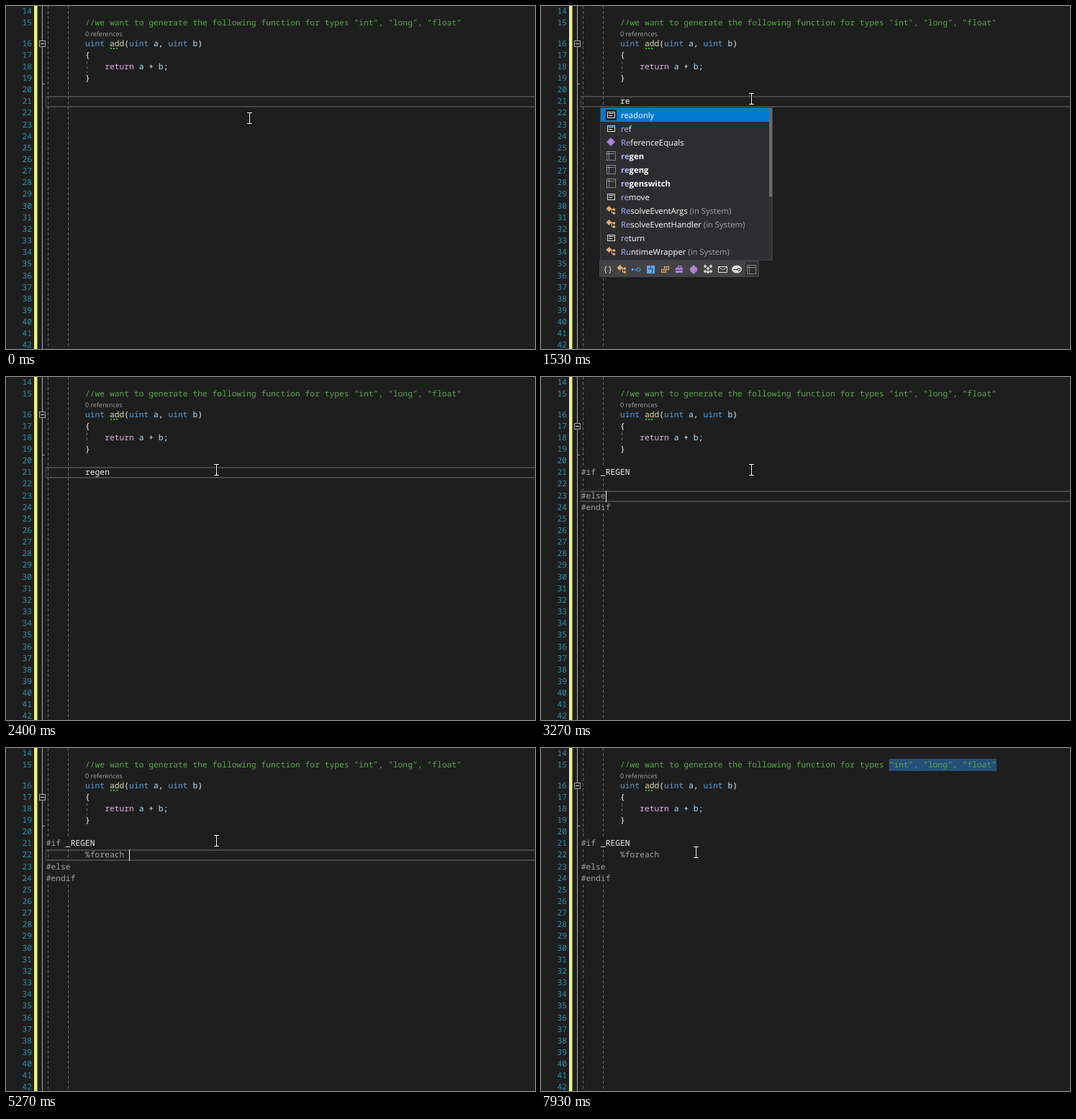
Recreate the animation shown at these times as an HTML page with a canvas. Size 735 by 477 pixels, loop 8 s.

```html
<!DOCTYPE html>
<html>
<head>
<meta charset="utf-8">
<style>
  html, body { margin: 0; width: 100%; height: 100%; overflow: hidden; background: #1e1e1e; }
  canvas { display: block; }
</style>
</head>
<body>
<canvas id="stage" width="735" height="477"></canvas>
<script>
const ctx = document.getElementById('stage').getContext('2d');
const LOOP = 8000, TICK = 1000 / 15, CELL = 6.79, LEFT = 55.7, CODE = 110;
const MONO = '11.3px "Noto Sans Mono", monospace';
const UI = '11.3px "Open Sans", sans-serif';
const UI_BOLD = 'bold 11.3px "Open Sans", sans-serif';
const PLAIN = '#f0f0f0', GREY = '#a3a3a3', BLUE = '#569cd6', LOCAL = '#b0e0ff';
const ORANGE = '#e8ab6a', PURPLE = '#b180d7', LIGHT = '#d8d8d8', SKY = '#55aaff';

const COMMENT = '//we want to generate the following function for types "int", "long", "float"';
const MOUSE = [
  [0, 338, 156], [130, 316, 141], [330, 292, 129], [5870, 292, 129], [6070, 400, 74],
  [6270, 590, 17], [6400, 634, 20], [6470, 632, 21], [6670, 576, 21], [6870, 532, 22],
  [7130, 486, 23], [7400, 486, 23], [7530, 410, 72], [7730, 226, 166], [7930, 215, 145]
];
const REGEN_TIMES = [1330, 1470, 1870, 2000, 2130];
const FOREACH_TIMES = [3930, 4270, 4330, 4400, 4530, 4600, 4730, 4870, 5270];
// from, to, line, column
const CARETS = [
  [330, 870, 21, 8], [1330, 1470, 21, 9], [2470, 2930, 24, 6], [3270, 3400, 23, 5],
  [3400, 3530, 21, 5], [3530, 3930, 22, 8]
];
const RX = 'System.Text.RegularExpressions';
const SHORT_LIST = [
  ['keyword', 'readonly'], ['keyword', 'ref'], ['method', 'ReferenceEquals'],
  ['snippet', 'regen'], ['snippet', 'regeng'], ['snippet', 'regenswitch'],
  ['keyword', 'remove'], ['class', 'ResolveEventArgs', 'System'],
  ['class', 'ResolveEventHandler', 'System'], ['keyword', 'return'],
  ['class', 'RuntimeWrapper', 'System']
];
const LONG_LIST = [
  ['snippet', 'regen'], ['snippet', 'regeng'], ['snippet', 'regenswitch'],
  ['class', 'Regex', RX], ['class', 'RegexCompilationInfo', RX],
  ['class', 'RegexMatchTimeoutException', RX], ['enum', 'RegexOptions', RX],
  ['hidden', 'RegexRunner', RX], ['hidden', 'RegexRunnerFactory', RX],
  ['class', 'RegionInfo', 'System.Globalization'],
  ['class', 'RegisteredWaitHandle', 'System.Threading']
];

// Whole-pixel centre of a text line.
const lineY = n => n < 16 ? 23 - 16 * (15 - n) : Math.floor(52 + 16.15 * (n - 16));

function rect(x, y, w, h, color) {
  ctx.fillStyle = color;
  ctx.fillRect(x, y, w, h);
}

function outline(x, y, w, h, color) {
  ctx.strokeStyle = color;
  ctx.strokeRect(x + .5, y + .5, w - 1, h - 1);
}

function path(points, color) {
  ctx.strokeStyle = color;
  ctx.beginPath();
  points.forEach(([x, y]) => ctx.lineTo(x, y));
  ctx.stroke();
}

// Monospaced text on the editor's character grid, given as text, colour pairs.
function code(x, line, ...parts) {
  ctx.font = MONO;
  for (let i = 0; i < parts.length; i += 2) {
    ctx.fillStyle = parts[i + 1];
    for (const ch of parts[i]) {
      ctx.fillText(ch, x, lineY(line) + 4);
      x += CELL;
    }
  }
}

function label(x, y, text, color, font = UI) {
  ctx.font = font;
  ctx.fillStyle = color;
  ctx.fillText(text, x, y);
  return x + ctx.measureText(text).width;
}

function guide(x, top, bottom) {
  ctx.setLineDash([4, 3]);
  path([[x, top], [x, bottom]], '#686868');
  ctx.setLineDash([]);
}

function diamond(x, y, r, color) {
  ctx.fillStyle = color;
  ctx.beginPath();
  ctx.moveTo(x - r, y);
  ctx.lineTo(x, y - r);
  ctx.lineTo(x + r, y);
  ctx.lineTo(x, y + r);
  ctx.fill();
}

function ring(x, y, r, color) {
  ctx.strokeStyle = color;
  ctx.beginPath();
  ctx.arc(x, y, r, 0, 7);
  ctx.stroke();
}

const ICONS = {
  snippet() {
    ctx.setLineDash([1, 1]);
    outline(-6, -6, 13, 13, LIGHT);
    path([[-6, -2.5], [6, -2.5]], LIGHT);
    path([[-2.5, -6], [-2.5, 6]], LIGHT);
    ctx.setLineDash([]);
  },
  class() {
    diamond(-2.5, -2, 4, ORANGE);
    path([[0, -1.5], [5, -1.5]], ORANGE);
    path([[1.5, -1], [1.5, 4], [4, 4]], ORANGE);
    diamond(4.5, -1, 2.2, ORANGE);
    diamond(4.5, 4, 2.2, ORANGE);
  },
  hidden() {
    ICONS.class();
    rect(-7, -7, 6, 6, '#2d2d30');
    path([[-6, -2], [-4, -6], [-2, -2]], LIGHT);
  },
  enum() {
    outline(-1, -4, 7, 5, ORANGE);
    outline(-5, 0, 7, 5, ORANGE);
    rect(1, -2, 3, 1, ORANGE);
    rect(-3, 2, 3, 1, ORANGE);
  },
  keyword() {
    outline(-5, -4, 11, 9, LIGHT);
    rect(-3, -2, 7, 1, LIGHT);
    rect(-3, 1, 5, 1, LIGHT);
  },
  method() {
    diamond(0, 0, 6, PURPLE);
  },
  braces() {
    label(-6, 4, '{}', LIGHT, MONO);
  },
  interface() {
    path([[-6, .5], [1, .5]], SKY);
    rect(-6, -1, 2, 3, SKY);
    ring(3.5, .5, 2.5, SKY);
  },
  struct() {
    rect(-5, -5, 11, 11, SKY);
    rect(-3, -1, 7, 1, '#424245');
    rect(0, -5, 1, 5, '#424245');
    rect(2, 0, 1, 6, '#424245');
  },
  toolbox() {
    rect(-5, -2, 10, 3, PURPLE);
    rect(-5, 2, 10, 3, PURPLE);
    outline(-2, -5, 5, 4, PURPLE);
  },
  cube() {
    diamond(0, -1, 5, PURPLE);
    rect(-5, -2, 10, 5, PURPLE);
    diamond(0, 2, 5, PURPLE);
  },
  delegate() {
    for (const [x, y] of [[-4, -4], [0, -1], [4, -4], [-4, 3], [4, 3], [0, 4]])
      diamond(x, y, 2.4, LIGHT);
  },
  event() {
    outline(-6, -4, 13, 9, LIGHT);
    path([[-5, -3], [.5, 1], [6, -3]], LIGHT);
  },
  key() {
    ctx.fillStyle = LIGHT;
    ctx.beginPath();
    ctx.ellipse(0, 0, 7, 5.5, 0, 0, 7);
    ctx.fill();
    path([[-5, .5], [2, .5]], '#333');
    ring(3, .5, 1.8, '#333');
  }
};
const TOOLBAR = ['braces', 'class', 'interface', 'struct', 'enum', 'toolbox', 'cube',
  'delegate', 'event', 'key', 'snippet'];

function icon(name, x, y) {
  ctx.save();
  ctx.translate(x, y);
  ICONS[name]();
  ctx.restore();
}

function popup(typed) {
  const short = typed.length < 3;
  const rows = short ? SHORT_LIST : LONG_LIST.filter(r => r[1].toLowerCase().startsWith(typed));
  const right = short ? 322 : 548, bottom = 145 + 19 * rows.length;
  rect(82, 141, right - 82, bottom - 141, '#2d2d30');
  outline(82, 141, right - 82, bottom - 141, '#3f3f46');
  rect(83, 142, right - 88, 19, '#007acc');
  if (rows.length > 9) {
    rect(right - 5, 142, 4, bottom - 143, '#333337');
    rect(right - 5, 142, 4, 123, '#6a6a6d');
  }
  rows.forEach(([kind, name, space], i) => {
    const y = 152 + 19 * i, font = kind === 'snippet' ? UI_BOLD : UI;
    if (i === 0) rect(90, y - 8, 15, 15, '#252526');
    icon(kind, 97, y - 1);
    let x = label(111, y + 4, name.slice(0, typed.length), i ? '#b0b4ff' : '#fff', font);
    x = label(x, y + 4, name.slice(typed.length), '#fff', font);
    if (space) label(x, y + 4, ` (in ${space})`, GREY);
    if (name === 'regeng' && !short) label(502, y + 4, name, '#fff');
  });
  rect(81, bottom, 222, 23, '#424245');
  rect(284, bottom + 2, 17, 19, '#2d2d30');
  TOOLBAR.forEach((name, i) => icon(name, 92 + 20 * i, bottom + 12));
}

function mouseAt(t) {
  const i = MOUSE.findIndex(p => p[0] > t);
  if (i < 0) return MOUSE[MOUSE.length - 1].slice(1);
  const [t0, x0, y0] = MOUSE[i - 1], [t1, x1, y1] = MOUSE[i];
  const k = (t - t0) / (t1 - t0);
  return [x0 + (x1 - x0) * k, y0 + (y1 - y0) * k].map(Math.round);
}

function drawMouse([x, y]) {
  rect(x - 4, y - 9, 9, 3, '#111');
  rect(x - 4, y + 6, 9, 3, '#111');
  rect(x - 1, y - 7, 3, 14, '#111');
  rect(x - 3, y - 8, 7, 1, '#fff');
  rect(x - 3, y + 7, 7, 1, '#fff');
  rect(x, y - 8, 1, 16, '#fff');
}

function drawCaret(line, x) {
  rect(Math.round(x), lineY(line) - 7, 1, 16, PLAIN);
}

function activeLine(t) {
  if (t < 2470) return 21;
  if (t < 3270) return 24;
  if (t < 3400) return 23;
  if (t < 3530) return 21;
  return t < 6400 ? 22 : t < 6530 ? 15 : 0;
}

function draw(t) {
  const expanded = t >= 2470, mouse = mouseAt(t);
  rect(0, 0, 735, 477, '#1e1e1e');
  rect(39, 0, 4.5, 477, '#eff284');
  ctx.lineWidth = 1;

  const current = activeLine(t);
  if (current) {
    const top = lineY(current) - 7;
    rect(55, top, 680, 2, '#464646');
    rect(55, top + 14, 680, 2, '#464646');
    rect(55, top, 1, 16, '#464646');
  }

  // outlining margin
  rect(50, 0, 1, 477, '#a5a5a5');
  rect(50, 108, 4, 1, '#a5a5a5');
  const fold = expanded && t < 6800 ? 68 : 52;
  rect(46, fold - 4, 9, 9, '#1e1e1e');
  outline(46, fold - 4, 9, 9, '#a5a5a5');
  rect(48, fold, 5, 1, '#e0e0e0');

  const spans = expanded ? [[0, 125], [141, 157], [190, 477]] : [[0, 477]];
  for (const [top, bottom] of spans) {
    guide(58.5, top, bottom);
    guide(86.5, top, bottom);
  }
  guide(112.5, 77, 93);

  // selection is dragged leftwards from the end of the comment
  let start = COMMENT.length;
  if (t >= 6470) start = Math.min(start, Math.max(55, Math.round((mouse[0] - CODE) / CELL)));
  if (t > 7130) start = 55;
  const selX = CODE + start * CELL;
  rect(selX, 15, CODE + COMMENT.length * CELL - selX, 17, '#264f78');

  for (let n = 14; n <= 42; n++) code(22.5, n, String(n), '#2b91af');
  code(CODE, 15, COMMENT, '#57a64a');
  label(CODE, 42, '0 references', GREY, '9px "Open Sans", sans-serif');
  code(CODE, 16, 'uint ', BLUE, 'add', '#dcdcaa', '(', PLAIN, 'uint ', BLUE, 'a', LOCAL,
    ', ', PLAIN, 'uint ', BLUE, 'b', LOCAL, ')', PLAIN);
  for (let i = 0; i < 3; i++) rect(145 + 4 * i, 58, 2, 2, '#20c020');
  code(CODE, 17, '{', PLAIN);
  code(CODE, 18, '    return ', '#e2b0e8', 'a', LOCAL, ' + ', PLAIN, 'b', LOCAL, ';', PLAIN);
  code(CODE, 19, '}', PLAIN);

  if (expanded) {
    const count = FOREACH_TIMES.filter(at => at <= t).length;
    code(LEFT, 21, '#if ', GREY, '_REGEN', PLAIN);
    code(CODE, 22, '%foreach '.slice(0, count), GREY);
    code(LEFT, 23, '#else', GREY);
    code(LEFT, 24, '#endif', GREY);
    if (count && (t < 5000 || t >= 5270 && t < 5530)) drawCaret(22, CODE + count * CELL);
  } else {
    const typed = 'regen'.slice(0, REGEN_TIMES.filter(at => at <= t).length);
    code(CODE, 21, typed, PLAIN);
    if (t >= 1470 && t < 2400) popup(typed);
  }

  for (const [from, to, line, column] of CARETS)
    if (t >= from && t < to) drawCaret(line, LEFT + column * CELL);
  if (t >= 6400 && t < 7470) drawCaret(15, selX);
  drawMouse(mouse);
}

// The picture advances fifteen times a second.
function frame(now) {
  const tick = Math.floor((now % LOOP + 4) / TICK) % (LOOP / TICK);
  draw(Math.round(tick * TICK / 10) * 10);
  requestAnimationFrame(frame);
}
ctx.textRendering = 'geometricPrecision';
requestAnimationFrame(frame);
</script>
</body>
</html>
```
